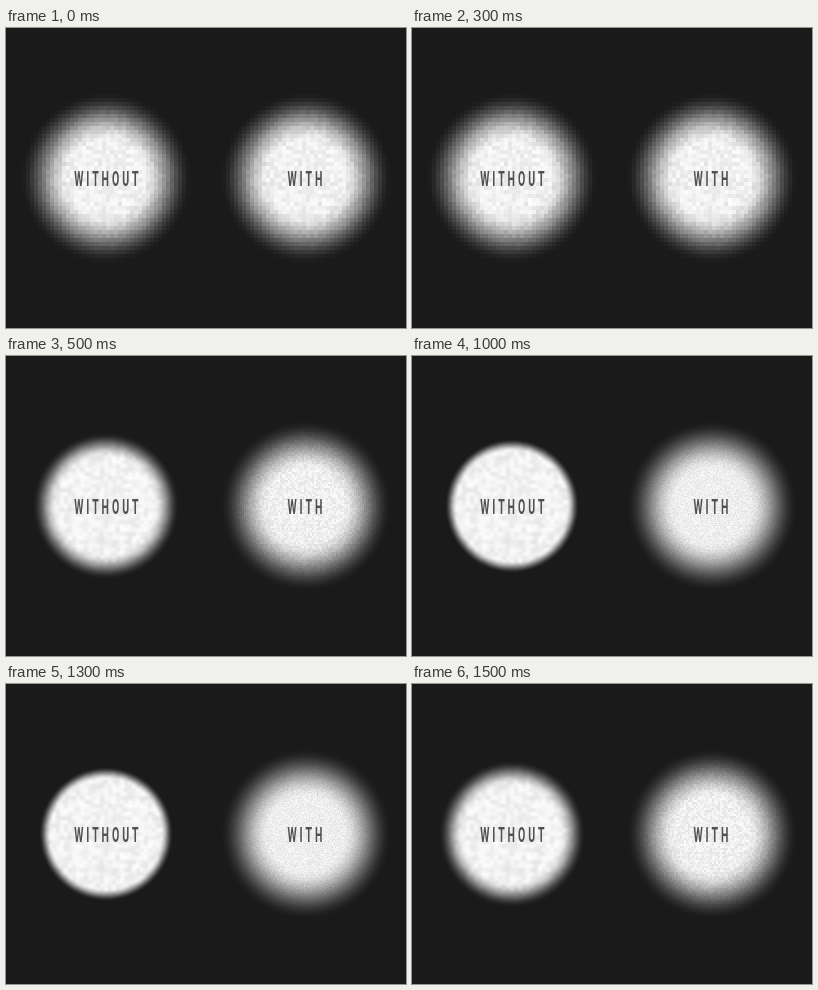
These frames come from a looping animation (400 px wide and 300 px high, 2 s). An HTML page with a canvas:

```html
<!DOCTYPE html>
<html lang="en">
<head>
<meta charset="utf-8">
<title>Without / With</title>
<style>
  html, body { margin: 0; width: 100%; height: 100%; overflow: hidden; background: #1a1a1a; }
  canvas, svg { position: absolute; left: 0; top: 0; width: 400px; height: 300px; }
  text { font: 700 21px Roboto, "Liberation Sans", sans-serif; letter-spacing: 5.9px; fill: #505050; text-anchor: middle; }
</style>
</head>
<body>
<canvas id="stage" width="400" height="300"></canvas>
<svg viewBox="0 0 400 300">
  <g transform="scale(.5 1)">
    <text x="203.6" y="158">WITHOUT</text>
    <text x="600.8" y="158">WITH</text>
  </g>
</svg>
<script>
const W = 400, H = 300, BG = 26, RADIUS = 61, REACH = 88;
const STEP = 500;
const ctx = document.getElementById('stage').getContext('2d');

const smooth = t => {
  t = Math.min(1, Math.max(0, t));
  return t * t * (3 - 2 * t);
};
const mix = (a, b, t) => a + (b - a) * t;

// Repeatable random value in 0..1 for a grid cell
function hash(i, j) {
  let h = Math.imul(i + 911, 374761393) ^ Math.imul(j + 577, 668265263);
  h = Math.imul(h ^ (h >>> 13), 1274126177);
  h = Math.imul(h ^ (h >>> 16), 2246822519);
  return ((h ^ (h >>> 15)) >>> 0) / 4294967296;
}

function softNoise(x, y) {
  const i = Math.floor(x), j = Math.floor(y);
  const u = x - i, v = y - j;
  return mix(
    mix(hash(i, j), hash(i + 1, j), u),
    mix(hash(i, j + 1), hash(i + 1, j + 1), u), v);
}

// cell: pixel size of the disc, blur: half width of its edge
function drawDisc(img, cx, { cell, blur, soft, mean, amp }) {
  const cy = H / 2;
  const snap = d => (Math.floor(d / cell) + 0.5) * cell;
  for (let dy = -REACH; dy < REACH; dy++) {
    for (let dx = -REACH; dx < REACH; dx++) {
      const r = Math.hypot(snap(dx), snap(dy));
      const cover = smooth((RADIUS + blur - r) / (2 * blur));
      if (!cover) continue;
      const n = soft
        ? softNoise((dx + 0.5) / 4, (dy + 0.5) / 4)
        : hash(Math.floor(dx / cell), Math.floor(dy / cell));
      const light = mix(BG, mean + amp * (n - 0.5), cover);
      const p = ((cy + dy) * W + cx + dx) * 4;
      img.data[p] = img.data[p + 1] = img.data[p + 2] = light;
    }
  }
}

function makeScene(left, right) {
  const img = ctx.createImageData(W, H);
  for (let p = 0; p < img.data.length; p += 4) {
    img.data[p] = img.data[p + 1] = img.data[p + 2] = BG;
    img.data[p + 3] = 255;
  }
  drawDisc(img, 100, left);
  drawDisc(img, 300, right);
  return img;
}

const coarse = { cell: 4, blur: 25, mean: 240, amp: 24 };
const low = makeScene(coarse, coarse);
const mid = makeScene(
  { cell: 1, blur: 12.5, soft: true, mean: 241, amp: 28 },
  { cell: 2, blur: 25, mean: 239, amp: 24 });
const high = makeScene(
  { cell: 1, blur: 6.25, soft: true, mean: 241, amp: 28 },
  { cell: 1, blur: 25, mean: 238, amp: 26 });
const scenes = [low, mid, high, mid];

let shown = -1;
function render(time) {
  const index = Math.floor(time / STEP) % scenes.length;
  if (index !== shown) ctx.putImageData(scenes[shown = index], 0, 0);
}

render(0);
let start;
function tick(now) {
  start ??= now;
  render(now - start);
  requestAnimationFrame(tick);
}
requestAnimationFrame(tick);
</script>
</body>
</html>
```
